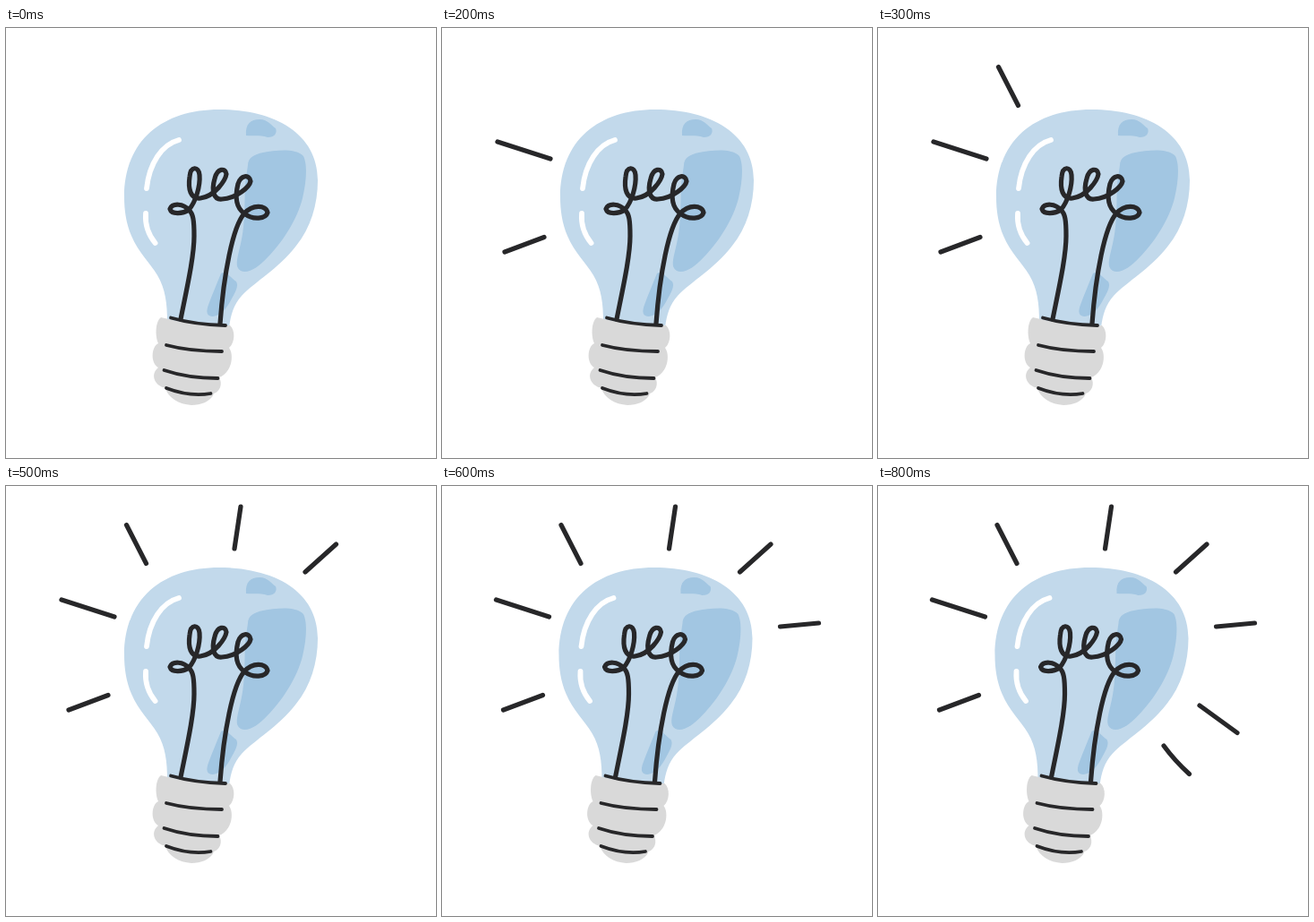
These frames come from a looping animation (480x480 px, 0.9 s). An HTML page:

```html
<!DOCTYPE html>
<html lang="en">
<head>
<meta charset="utf-8">
<title>Light bulb</title>
<style>
  html, body { margin: 0; width: 100%; height: 100%; overflow: hidden; background: #fff; }
  svg { display: block; width: 100%; height: 100%; }
  .glass { fill: #c2d9eb; }
  .tint { fill: #a2c6e2; }
  .cap { fill: #d9d9d9; }
  .line { fill: none; stroke: #272729; stroke-width: 5.2; stroke-linecap: round; stroke-linejoin: round; }
  .shine { stroke: #fff; stroke-width: 5.8; }
  .thread { stroke-width: 3.8; }
</style>
</head>
<body>
<svg viewBox="0 0 480 480">
  <g id="scene">
    <path class="glass" d="M180 328C180 308 178 291 169 276C160 261 148 251 140 232C134 218 132 203 132 189C132 125 175 91 238 91C300 91 348 118 348 170C348 197 340 223 324 243C304 269 278 283 263 299C254 309 251 320 249 334Z"/>
    <g class="tint">
      <path d="M268 120C267 107 273 102 283 102C293 102 297 110 301 112C303 117 300 122 292 122C282 119 276 121 268 120Z"/>
      <path d="M270 153C270 145 277 141 287 139C302 136 324 134 332 143C337 153 335 174 331 190C325 214 308 240 292 256C282 267 270 275 262 271C255 267 258 258 261 245C269 215 265 185 268 167Z"/>
      <path d="M240 274C245 270 250 278 257 283C260 288 256 295 252 302C247 312 240 321 231 322C224 322 223 317 226 309C230 298 235 286 240 274Z"/>
    </g>
    <path class="line shine" d="M193 125C174 130 160 151 157 179M156 207C155 220 160 232 166.500 240"/>
    <path class="cap" d="M173 323C194 329 226 332 250 332C256 337 256 351 249 357C255 365 252 385 238 390C242 397 239 406 232 408C229 417 217 421 207 421C193 420 181 413 178 402C165 399 161 386 170 379C161 374 162 356 170 352C166 343 167 327 173 323Z"/>
    <path class="line" d="M195 325C202 290 210 255 210 232C210 215 209 207 204 203C198 196 186 195 183 202C185 209 198 207 204 203C212 194 217 176 216 164C215 154 206 154 205 166C203 180 206 191 217 190C233 188 245 170 246 163C245 156 236 156 233 168C229 182 232 192 241 191C258 190 272 177 273 171C272 163 262 164 259 174C256 186 256 200 266 207C276 215 290 213 292 206C290 197 275 197 266 207C253 222 243 275 239 330"/>
    <path class="line thread" d="M184 323.500Q210 331 245 332M179 354Q205 361 241 361M176.500 382Q203 391 236.500 391M179 402Q205 412 228.500 408"/>
    <!-- Rays in order of appearance -->
    <g id="rays" class="line">
      <path d="M70 250L114 233.500"/>
      <path d="M62 127L121 146"/>
      <path d="M134.500 43.500L156.500 86.500"/>
      <path d="M262 23L255 70"/>
      <path d="M368.500 65L334 96"/>
      <path d="M379 157L422 153"/>
      <path d="M360.500 245L402.500 275.500"/>
      <path d="M320.500 290Q333 307 349 321.500"/>
    </g>
  </g>
</svg>
<script>
const STEP_MS = 100;
const scene = document.getElementById('scene');
const rays = [...document.getElementById('rays').children];
const steps = rays.length + 1;

// One more ray appears per step; the drawing nudges left for the last third.
function draw(time) {
  const step = Math.floor(time / STEP_MS) % steps;
  rays.forEach((ray, i) => ray.setAttribute('visibility', i < step ? 'visible' : 'hidden'));
  scene.setAttribute('transform', `translate(${step >= steps * 2 / 3 ? -1.5 : 0} 0)`);
}

const start = performance.now();
function tick() {
  draw(performance.now() - start);
  requestAnimationFrame(tick);
}
tick();
</script>
</body>
</html>
```
